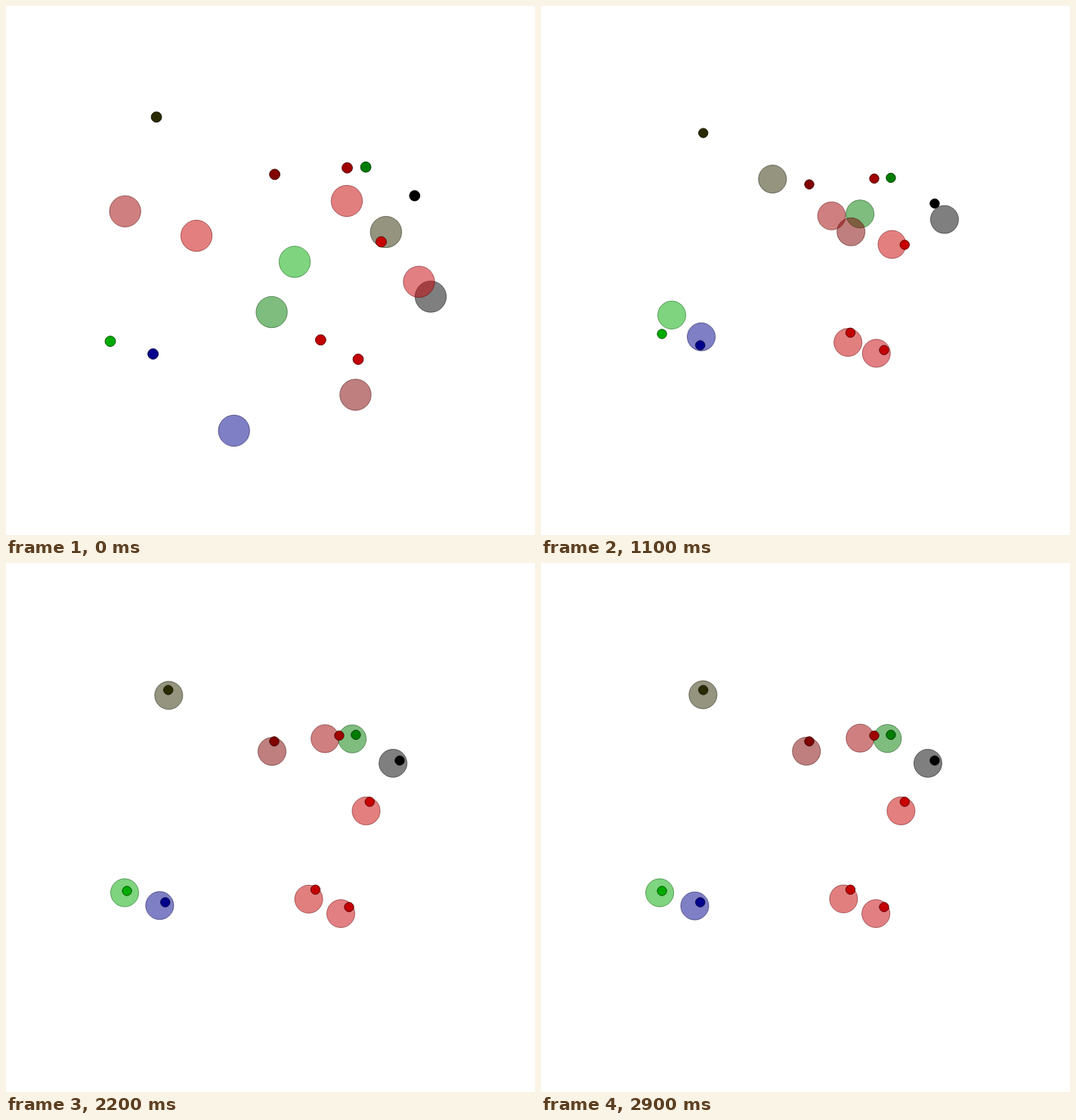
Write an HTML page with a canvas that moves like this. It is 700x700 px and loops after 3000 ms.

```html
<!DOCTYPE html>
<html lang="en">
<head>
<meta charset="utf-8">
<title>Movers and goals</title>
<style>
  html, body { margin: 0; width: 100%; height: 100%; overflow: hidden; background: #fff; }
  canvas { display: block; width: 700px; height: 700px; }
</style>
</head>
<body>
<canvas id="stage" width="700" height="700"></canvas>
<script>
const ctx = document.getElementById('stage').getContext('2d');
const MID = 350, STEP = 100, STEPS = 30;
const UNIT = 123.7;          // pixels per world unit once the camera has settled
const TURN = 7, HOMING = 11; // steps at which a mover leaves its first and second leg
const PULL = 0.55;           // stiffness of the final approach
const movers = [], goals = [];

// Cubic from a to b over h steps, with end velocities va and vb.
function glide(a, b, va, vb, h, t) {
  const u = t / h, w = 1 - u;
  return a * (1 + 2 * u) * w * w + b * (1 + 2 * w) * u * u + h * u * w * (va * w - vb * u);
}

// Critically damped spring that starts at p with velocity v and comes to rest at end.
function settle(p, v, end, t) {
  const d = p - end;
  return end + (d + (v + PULL * d) * t) * Math.exp(-PULL * t);
}

// One coordinate: speed up to the turn, carry on to the homing point, then settle.
function travel(start, turn, homing, rest, push) {
  const legs = HOMING - TURN;
  const v1 = (turn - start) / TURN, v2 = (homing - turn) / legs;
  const v0 = v1 * 0.3 + push, mid = (v1 * legs + v2 * TURN) / HOMING;
  return k =>
    k < TURN ? glide(start, turn, v0, mid, TURN, k) :
    k < HOMING ? glide(turn, homing, mid, v2, legs, k - TURN) :
    settle(homing, v2, rest, k - HOMING);
}

function add(color, goal, start, turn, homing, rest, push = 0) {
  const x = travel(start[0], turn[0], homing[0], rest[0], push);
  const y = travel(start[1], turn[1], homing[1], rest[1], 0);
  goals.push({ color, pos: goal });
  movers.push({ color, at: k => [x(k), y(k)] });
}

add([42, 42, 0], [214.7, 168], [487, 304.3], [394.3, 244], [306.3, 229], [214.3, 174.3]);
// This one starts in contact with a neighbour and is knocked outwards.
add([0, 0, 0], [521, 261.3], [540, 381], [567.2, 331], [534, 282.5], [512, 265], 20.8);
add([160, 0, 0], [441, 228.3], [177.6, 279.8], [302.2, 279.7], [384.6, 277.7], [422.3, 231.7]);
add([0, 125, 0], [463, 227.3], [351.4, 399.3], [360, 306.7], [422.2, 275.2], [458.4, 232.2]);
add([128, 0, 0], [355, 236], [450.8, 497.4], [438.2, 369.6], [410.2, 298.8], [351.2, 249]);
add([0, 0, 140], [210.7, 449], [306.7, 540], [246.3, 475.8], [212, 437.8], [203.4, 453.8]);
add([0, 170, 0], [160, 434], [378.7, 339.7], [226.2, 347.2], [173, 409], [157, 436.4]);
add([195, 0, 0], [409.5, 432.3], [440.5, 267.5], [391.8, 395.5], [406.2, 445.2], [400.4, 444.5]);
add([195, 0, 8], [454, 455.3], [526.1, 363.4], [463, 444.8], [443.8, 459.6], [443.2, 464]);
add([200, 0, 0], [481.3, 316], [262.2, 308.8], [406.4, 276], [464.5, 315.5], [476.4, 328]);

// The camera only ever widens, to hold the farthest position reached so far.
const zooms = [];
let reach = 0;
for (let k = 0; k < STEPS; k++) {
  for (const m of movers)
    for (const v of m.at(k)) reach = Math.max(reach, Math.abs(v - MID));
  zooms.push(MID / (1 + reach / UNIT) / UNIT);
}

function disc([x, y], r, color, alpha, zoom) {
  ctx.beginPath();
  ctx.arc(MID + (x - MID) * zoom, MID + (y - MID) * zoom, r * UNIT * zoom, 0, Math.PI * 2);
  ctx.fillStyle = `rgba(${color}, ${alpha})`;
  ctx.fill();
  ctx.strokeStyle = `rgba(${color.map(c => c >> 1)}, ${alpha})`;
  ctx.stroke();
}

function draw(k) {
  ctx.fillStyle = '#fff';
  ctx.fillRect(0, 0, 700, 700);
  for (const m of movers) disc(m.at(k), 0.15, m.color, 0.5, zooms[k]);
  for (const g of goals) disc(g.pos, 0.05, g.color, 1, zooms[k]);
}

const start = performance.now();
function tick() {
  draw(Math.floor((performance.now() - start) / STEP) % STEPS);
  requestAnimationFrame(tick);
}
tick();
</script>
</body>
</html>
```
